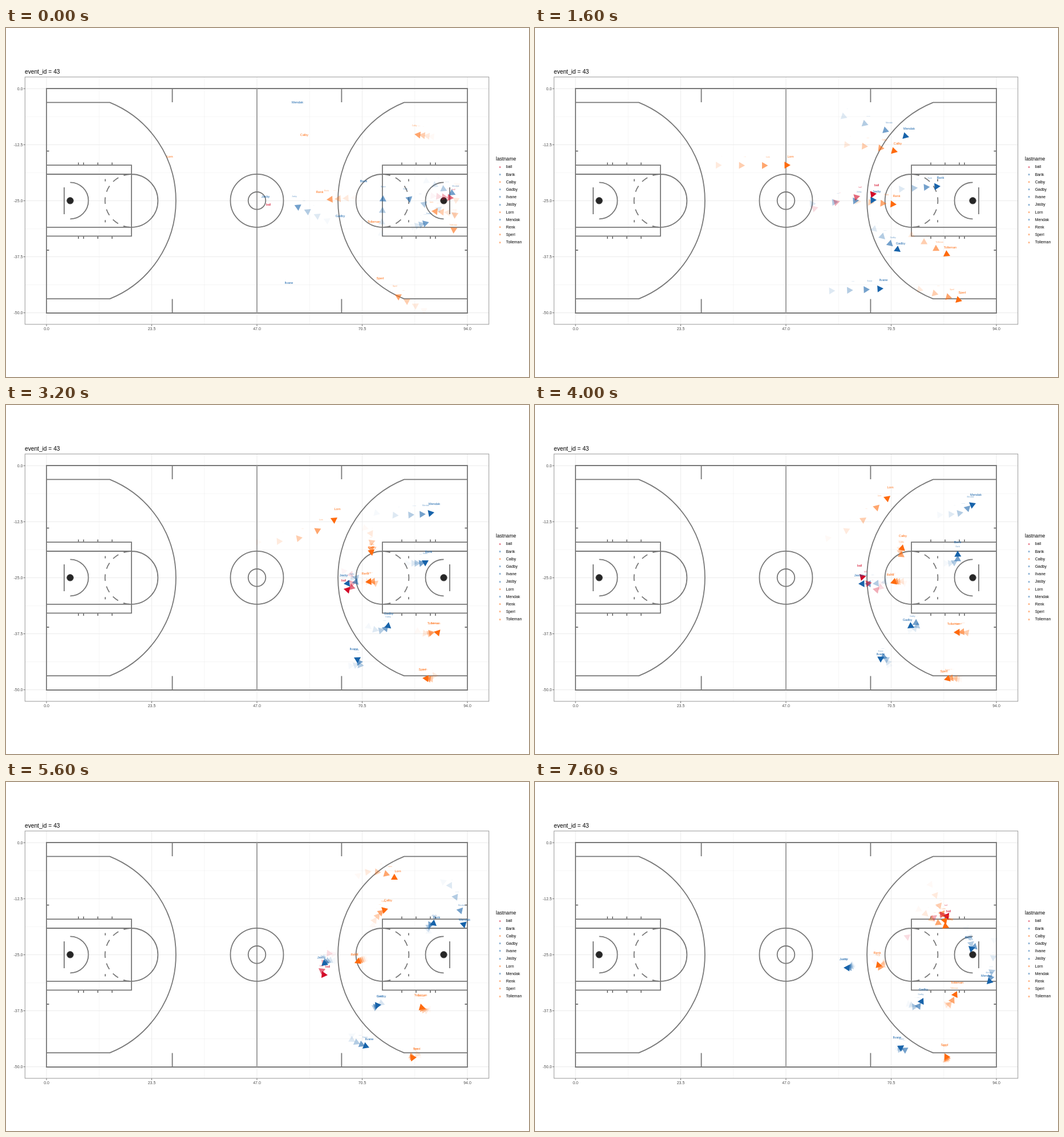
These frames come from a looping animation (917x611 px, 8000 ms). An HTML page:

```html
<!DOCTYPE html>
<html lang="en">
<head>
<meta charset="utf-8">
<title>event_id = 43</title>
<style>
  html, body { margin: 0; height: 100%; overflow: hidden; background: #fff; }
  svg { display: block; width: 100vw; height: 100vh; font-family: "Liberation Sans", Arial, sans-serif; }
  #court { fill: none; stroke: #787878; stroke-width: 1.8; }
  #axes { font-size: 7px; fill: #4d4d4d; }
  #marks text { text-anchor: middle; }
</style>
</head>
<body>
<svg viewBox="0 0 917 611">
  <g id="grid" stroke="#ebebeb"></g>
  <rect x="33.3" y="85.8" width="813.4" height="433" fill="none" stroke="#999"/>
  <g id="axes"></g>
  <text x="33" y="79.7" font-size="10.2">event_id = 43</text>
  <g id="court">
    <g id="half">
      <path d="M440 106H71V499H440M71 130.3H182A185.5 185.5 0 0 1 182 474.2H71M291.6 106v24M291.6 474.5v24"/>
      <path d="M71 240.2H220V364.4H71M71 256H220a46.4 46.4 0 0 1 0 92.8H71"/>
      <path d="M220 256a46.4 46.4 0 0 0 0 92.8" stroke-dasharray="11.5 9.9" stroke-dashoffset="-2.5"/>
      <path d="M174 264.5v4M174 336.2v4M71 215.5h4.5M71 389h4.5"/>
      <path id="ticks" d="M127 235.5v4M136 235.5v4M161 235.5v4M186 235.5v4"/>
      <use href="#ticks" y="129.5"/>
      <path d="M102 279V326M112.5 270.3a32 32 0 0 1 0 64"/>
      <circle cx="112.5" cy="302.3" r="5.8" fill="#262626" stroke="#444" stroke-width=".8"/>
    </g>
    <use href="#half" transform="translate(880) scale(-1 1)"/>
    <path d="M440 106V499" stroke="#a0a0a0" stroke-width="2"/>
    <circle cx="440" cy="302.3" r="46.5"/>
    <circle cx="440" cy="302.3" r="15.3"/>
  </g>
  <g id="marks"></g>
  <text x="859" y="231.5" font-size="8.7">lastname</text>
  <g id="legend" font-size="6.9"></g>
</svg>
<script>
const $ = id => document.getElementById(id);
const RED = '#d30a28', BLUE = '#1763aa', ORANGE = '#ff6a0d';
const STEP = 400, STEPS = 20, RADIUS = 7;
const KEYS = [0, 4, 6, 8, 10, 14, 17, 19];   // steps at which way points are reached
const FADE = [1, .6, .33, .14, .04];         // by age of a mark
const players = [];

// before: place and stride just ahead of step 0; way: x, y at each key step
const add = (name, color, before, ...way) => players.push({ name, color, before, way });

add('ball', RED, [778, 297, 10, 1], 460,324, 599,290, 606,319, 592,322, 569,296, 564,338, 705,233, 725,241);
add('Barik', BLUE, [707, 299, -26, -9], 627,283, 711,277, 727,277, 741,272, 741,255, 755,252, 766,290, 760,287);
add('Calby', ORANGE, [723, 187, -8, -1], 523,202, 636,217, 640,247, 642,264, 645,244, 670,222, 701,244, 726,255);
add('Gadby', BLUE, [735, 342, 7, -2], 586,344, 641,392, 664,393, 671,380, 653,391, 658,390, 672,393, 681,378);
add('Ilvane', BLUE, [661, 300, 1, -20], 496,461, 611,456, 618,449, 610,442, 606,451, 637,465, 647,468, 635,462);
add('Jasby', BLUE, [512, 313, -17, -8], 455,310, 599,301, 616,309, 592,313, 567,313, 553,322, 547,325, 541,325);
add('Lorn', ORANGE, [753, 321, -11, -1], 287,240, 448,240, 520,232, 581,197, 623,159, 687,171, 711,223, 721,249);
add('Mendak', BLUE, [782, 289, 15, 7], 511,145, 656,191, 716,192, 751,188, 773,172, 804,256, 800,339, 792,354);
add('Renk', ORANGE, [569, 300, -14, 1], 550,302, 634,309, 641,309, 630,310, 623,312, 611,317, 603,321, 600,314);
add('Sperl', ORANGE, [688, 470, -15, -8], 656,453, 749,478, 738,479, 730,478, 717,481, 720,482, 720,479, 718,475);
add('Tolleman', ORANGE, [785, 353, -2, 26], 645,354, 728,399, 749,398, 750,397, 734,398, 727,388, 731,384, 740,366);

// smooth curve through the way points of one axis (0 = x, 1 = y)
function along(way, axis, n) {
  const last = KEYS.length - 1;
  const at = i => way[i * 2 + axis];
  const slope = i => {
    const a = Math.max(i - 1, 0), b = Math.min(i + 1, last);
    return (at(b) - at(a)) / (KEYS[b] - KEYS[a]);
  };
  let i = 0;
  while (i < last - 1 && n >= KEYS[i + 1]) i++;
  const span = KEYS[i + 1] - KEYS[i], u = (n - KEYS[i]) / span, v = 1 - u;
  return at(i) * v * v * (1 + 2 * u) + at(i + 1) * u * u * (3 - 2 * u)
    + span * u * v * (v * slope(i) - u * slope(i + 1));
}

// tip of the arrow and its heading, which is the direction of the latest stride
function pose({ before, way }, n) {
  if (n < 0) {
    const [x, y, dx, dy] = before, heading = Math.atan2(dy, dx);
    return {
      x: x + dx * (n + 1) + RADIUS * Math.cos(heading),
      y: y + dy * (n + 1) + RADIUS * Math.sin(heading), heading
    };
  }
  const x = along(way, 0, n), y = along(way, 1, n);
  return { x, y, heading: n && Math.atan2(y - along(way, 1, n - 1), x - along(way, 0, n - 1)) };
}

const text = (x, y, s, extra = '') => `<text x="${x}" y="${y}" ${extra}>${s}</text>`;

function drawAxes() {
  let grid = '', axes = '';
  const line = (d, w) => grid += `<path d="${d}" stroke-width="${w}"/>`;
  for (let i = 0; i < 9; i++) {
    const x = 71 + i * 92.25, y = 106.2 + i * 49.05, w = i % 2 ? .5 : 1;
    line(`M${x} 86V519`, w);
    line(`M33 ${y}H847`, w);
    if (i % 2) continue;
    axes += `<path d="M30.5 ${y}h3M${x} 519v3" stroke="#555" stroke-width=".8"/>`
      + text(29.5, y + 2.5, (i ? '-' : '') + (i * 6.25).toFixed(1), 'text-anchor="end"')
      + text(x, 528.5, (i * 11.75).toFixed(1), 'text-anchor="middle"');
  }
  $('grid').innerHTML = grid;
  $('axes').innerHTML = axes;
}

function drawLegend() {
  $('legend').innerHTML = players.map((p, i) => {
    const y = 245.4 + i * 13.2;
    return text(864.4, y - .9, 'a', `font-size="5.5" font-weight="bold" opacity=".75" fill="${p.color}"`)
      + text(876.7, y, p.name);
  }).join('');
}

function triangle({ x, y, heading }) {
  const cx = x - RADIUS * Math.cos(heading), cy = y - RADIUS * Math.sin(heading);
  return [0, 1, 2].map(i => {
    const a = heading + i * Math.PI * 2 / 3;
    return `${(cx + RADIUS * Math.cos(a)).toFixed(1)},${(cy + RADIUS * Math.sin(a)).toFixed(1)}`;
  }).join(' ');
}

function drawStep(n) {
  let shapes = '', labels = '';
  for (let age = FADE.length - 1; age >= 0; age--) {
    const k = n - age, size = 5.6 * FADE[age];
    for (const p of [...players].reverse()) {
      const at = pose(p, k);
      // no arrow at step 0: there is no stride yet
      if (k) shapes += `<polygon points="${triangle(at)}" fill="${p.color}" opacity="${FADE[age]}"/>`;
      labels += text(at.x, at.y - 15.3 + size * .35, p.name,
        `font-size="${size}" fill="${p.color}" opacity="${FADE[age]}"`);
    }
  }
  $('marks').innerHTML = shapes + labels;
}

let shown = -1;
function tick() {
  const n = Math.floor(performance.now() / STEP) % STEPS;
  if (n !== shown) drawStep(shown = n);
  requestAnimationFrame(tick);
}

drawAxes();
drawLegend();
tick();
</script>
</body>
</html>
```
